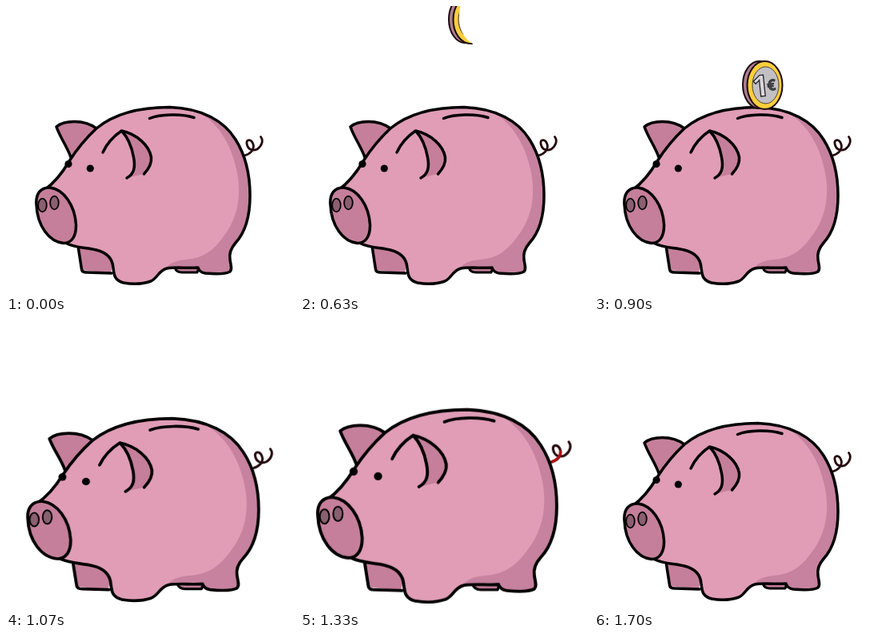
An HTML page that plays this animation: 360x360 px, repeating every 1.81 s.

```html
<!DOCTYPE html>
<html lang="en">
<head>
<meta charset="utf-8">
<title>Piggy bank</title>
<style>
  html, body { margin: 0; width: 100%; height: 100%; overflow: hidden; background: #fff; }
  svg { display: block; width: 100%; height: 100%; }
  .line { fill: none; stroke: #000; stroke-width: 3.5; stroke-linecap: round; stroke-linejoin: round; }
  .skin { fill: #e09db5; }
  .shade { fill: #c6829f; }
  .dark { fill: #c57f9a; }
  .nostril { fill: #8a5f70; stroke: #000; stroke-width: 1.8; }
  .tail { stroke: #24080d; stroke-width: 2.8; }

  .pig, .coin, .gap, .glow { animation: 1810ms linear infinite; }
  .pig { transform-origin: 171px 315px; animation-name: swell; }
  .coin { animation-name: drop; }
  .gap { animation-name: gap; animation-timing-function: step-end; }
  .glow { stroke: #b80c14; animation-name: glow; animation-timing-function: step-end; }

  @keyframes swell {
    0%, 57.46% { transform: scale(1, 1); }
    59.12% { transform: scale(1.08, 1.03); }
    62.43% { transform: scale(1.133, 1.13); animation-timing-function: ease-in-out; }
    66.2%, 73.6% { transform: scale(1.1185, 1.09); animation-timing-function: ease-in-out; }
    84.53% { transform: scale(1.093, .99); }
    88.4% { transform: scale(1.087, 1); }
    93.8%, 100% { transform: scale(1, 1); }
  }
  @keyframes drop {
    0%, 24.31% { transform: translateY(-140px); }
    49.72% { transform: translateY(0); animation-timing-function: ease-in; }
    57.46%, 100% { transform: translateY(76px); }
  }
  /* the face stays blank until the coin is fully in view */
  @keyframes gap {
    0% { opacity: 1; }
    37.57%, 100% { opacity: 0; }
  }
  @keyframes glow {
    0% { opacity: 0; }
    62.43% { opacity: 1; }
    80%, 100% { opacity: 0; }
  }
</style>
</head>
<body>
<svg viewBox="0 0 360 360">
  <defs>
    <path id="body" d="M48 230C58 223 69 211 79 194C88 180 99 166 113 153C136 134 170 126.500 205 126.500C246 128 273 144 287 167C299 186 305 211 305 237C305 266 298 284 287 296C280 304 279 311 280 317C281 324 283 329 280 332C273 336 259 335 249 334Q242 333 240 327C226 328 212 326 201 328C190 331 190 340 181 344C171 347.500 158 348 147 346C136 343 135 337 134 327C133 314 125 308 113 305C100 301.500 88 303 74 296Z"/>
    <clipPath id="inside"><use href="#body"/></clipPath>
    <clipPath id="aboveSlot"><path d="M150 0H270V139H236C220 134 193 134 179 140H150Z"/></clipPath>
  </defs>

  <g class="pig">
    <path class="line tail" d="M298 187C305 185 311 180 309 173C307 166 300 166 301 172C302 179 308 182 314 179C320 175 322 168 318.500 163.500"/>
    <path class="line tail glow" d="M300 186C305 184 310 180 309 174"/>

    <path class="line dark" d="M81 189C76 175 68 165 63 151C72 143 97 141 113 153"/>
    <path class="dark" d="M90 296L94.500 330L131 334L134 318L122 295Z"/>
    <path class="line" d="M90.500 303L94.500 329Q95 333 101 333L132 334"/>
    <path class="line dark" style="stroke-width:3" d="M211 327Q213 333 220 333H239L241 327Z"/>

    <use href="#body" class="skin"/>
    <path class="shade" clip-path="url(#inside)" d="M242 133C268 149 282 176 288 204C296 239 288 267 272 288C259 306 247 315 225 317C213 318 204 321 199 329L240 340H320V130Z"/>
    <use href="#body" class="line"/>

    <path class="line dark" d="M38 248C37 235 43 226.500 55 227C72 229 86 249 87.500 273C88 288 82 296.500 72 296.500C54 295 39 275 38 248Z"/>
    <ellipse class="nostril" cx="45.500" cy="249" rx="5.300" ry="8.300"/>
    <ellipse class="nostril" cx="60.500" cy="246" rx="5.300" ry="8.300"/>
    <circle cx="78" cy="197.500" r="4.600"/>
    <circle cx="105.300" cy="203" r="4.600"/>

    <path class="dark" d="M144.500 156C163 160 179 174 181.500 189C182.500 197 178 204 172.500 210Q162 212 151 215C160 210 162 202 159.500 189C157 175 152 164 144.500 156Z"/>
    <path class="line" d="M121 183C126 172 134 163 144.500 156C163 160 179 174 181.500 189C182.500 197 178 204 172.500 210M144.500 156C152 164 157 175 159.500 189C162 202 160 210 151 215"/>
    <path class="line" d="M179.500 140.500C193 135 220 134.500 235 139.500"/>
  </g>

  <g clip-path="url(#aboveSlot)">
    <g class="coin">
      <ellipse cx="206.500" cy="98.500" rx="20.500" ry="29.500" fill="#ad7f92" stroke="#1c090d" stroke-width="2"/>
      <ellipse cx="213.500" cy="99" rx="22" ry="30" fill="#fbce3c" stroke="#1c090d" stroke-width="2"/>
      <ellipse cx="214.500" cy="99" rx="16.500" ry="23" fill="#c3c0c4" stroke="#4a4038" stroke-width="1"/>
      <g font-family="'Open Sans', 'DejaVu Sans', sans-serif" font-weight="700" fill="#d9d7da" stroke="#222" stroke-width="1.300">
        <text transform="translate(199 114) rotate(-6)" font-size="37">1</text>
        <text transform="translate(217 106) rotate(-6)" font-size="19" stroke-width=".6" fill="#444">€</text>
      </g>
      <path class="gap" fill="#fff" d="M208 60C194 88 196 118 216 129V136H245V60Z"/>
    </g>
  </g>
</svg>
</body>
</html>
```
